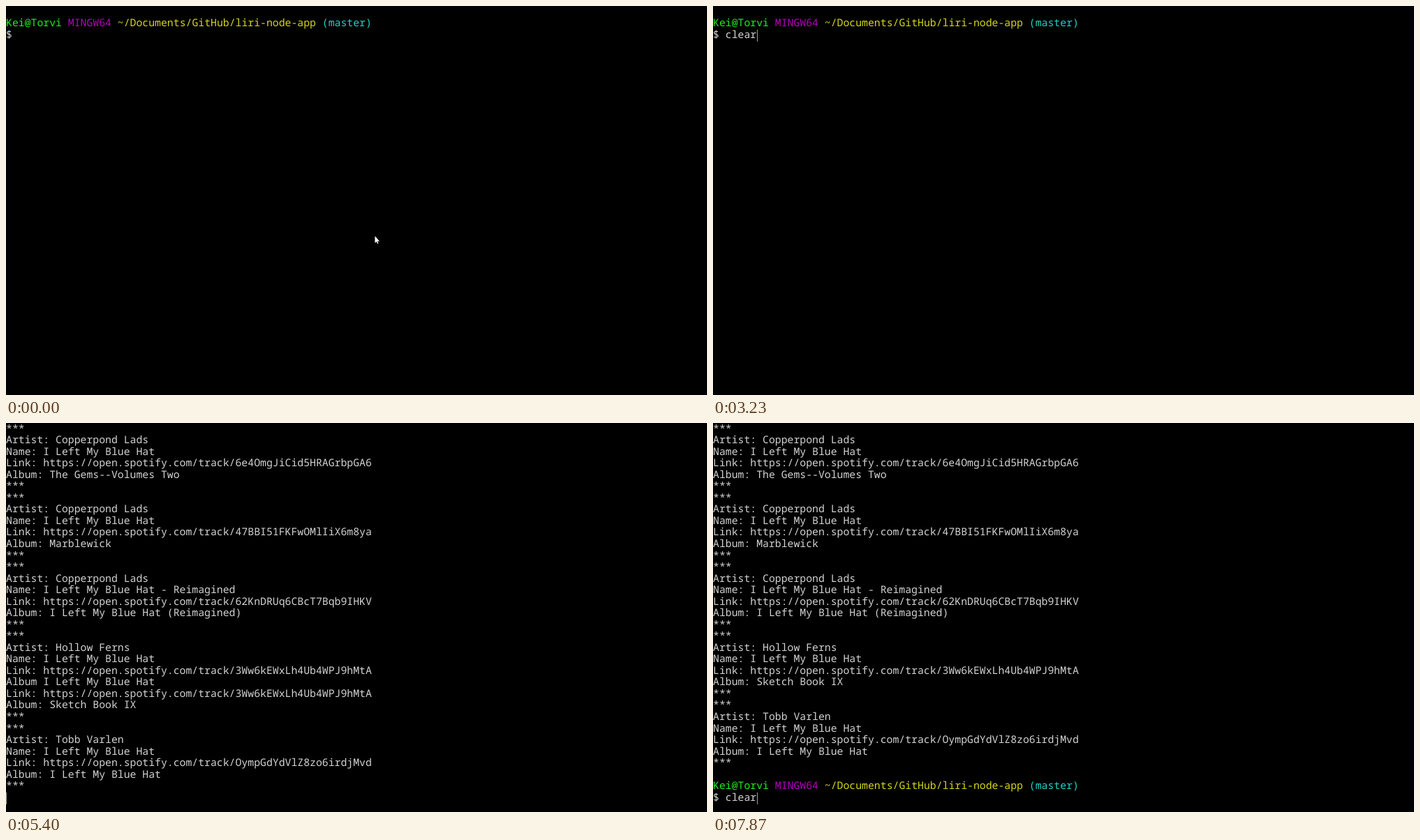
Animation of 1004x558 px, one loop 8 s. Source, as an HTML page:

```html
<!DOCTYPE html>
<html>
<head>
<meta charset="utf-8">
<style>
html, body { margin: 0; width: 100%; height: 100%; overflow: hidden; background: #000; }
pre {
  position: absolute; left: 0; top: -0.3px; margin: 0; color: #d2d2d2;
  font: 500 14.81px/16.53px "Noto Sans Mono", "DejaVu Sans Mono", monospace;
  text-rendering: geometricPrecision; font-variant-ligatures: none;
}
#caret { position: absolute; left: 0; top: 0; width: 1px; height: 17px; background: #a0a0a0; }
#mouse { position: absolute; left: 528px; top: 0; overflow: visible; }
</style>
</head>
<body>
<pre id="term"></pre>
<div id="caret"></div>
<svg id="mouse" width="8" height="12"><path d="M.4 0V10L2.6 7.9 4.1 11 5.4 10.4 4 7.4H7Z" fill="#fff"/></svg>
<script>
const LOOP = 8000, COL = 8.886, ROW = 16.53, SWEEP_COLS = 60;
const $ = id => document.getElementById(id);
const term = $('term'), caret = $('caret'), mouse = $('mouse');

const PROMPT = 'Kei@Torvi MINGW64 ~/Documents/GitHub/liri-node-app (master)';
const COLORS = ['#1cf01c', '#b400bc', '#d6d61a', '#1ed4c8'];
const promptHtml = PROMPT.split(' ')
  .map((s, i) => `<span style="color:${COLORS[i]}">${s}</span>`).join(' ');

const RUN = '$ node liri.js do-what-it-says';
const BAND = 'Copperpond Lads', SONG = 'I Left My Blue Hat';
const block = (artist, name, id, album) => [
  '***', 'Artist: ' + artist, 'Name: ' + name,
  'Link: https://open.spotify.com/track/' + id, 'Album: ' + album, '***'
];
const buffer = [
  '', PROMPT, RUN, 'this is loaded', 'Content Added!',
  ...block(BAND, SONG, '6e4OmgJiCid5HRAGrbpGA6', 'The Gems--Volumes Two'),
  ...block(BAND, SONG, '47BBI51FKFwOMlIiX6m8ya', 'Marblewick'),
  ...block(BAND, SONG + ' - Reimagined', '62KnDRUq6CBcT7Bqb9IHKV', SONG + ' (Reimagined)'),
  ...block('Hollow Ferns', SONG, '3Ww6kEWxLh4Ub4WPJ9hMtA', 'Sketch Book IX'),
  ...block('Tobb Varlen', SONG, 'OympGdYdVlZ8zo6irdjMvd', SONG),
  '', PROMPT
];

// time, first and end buffer line, input line, characters repainted so far
const steps = [
  [0, 0, 2, '$ '],
  [3200, 0, 2, '$ clear'],
  [3730, 0, 2, RUN],
  [4470, 0, 3, ''],
  [4700, 0, 4, ''],
  [4970, 0, 5, ''],
  [5240, 3, 35, '', 717],
  [5270, 3, 35, '', 1350],
  [5300, 3, 35, ''],
  [5370, 5, 35, '', 660],
  [5400, 5, 35, '', 1325],
  [5440, 5, 35, ''],
  [5500, 5, 37, '$ '],
  [7600, 5, 37, RUN],
  [7840, 5, 37, '$ clear']
];
const blinks = [200, 730, 1260, 1830, 2370, 2850, 3200, 4300, 4470, 5240,
  5370, 5900, 6440, 6970, 7500];

const view = (top, end, input) => [...buffer.slice(top, end), input];

// Repaints from top left, leaving the old rows after the given position.
function sweep(fresh, old, pos) {
  const r = Math.floor(pos / SWEEP_COLS), c = pos % SWEEP_COLS;
  return Array.from({ length: 33 }, (_, i) => {
    const a = fresh[i] || '', b = old[i] || '';
    return i < r ? a : i > r ? b : a.slice(0, c) + b.slice(c);
  });
}

let shown;
function draw(now) {
  const t = now % LOOP;
  const step = steps.filter(s => s[0] <= t).pop();
  if (step !== shown) {
    shown = step;
    const [, top, end, input, pos] = step;
    let rows = view(top, end, input);
    if (pos) rows = sweep(rows, top === 5 ? view(3, 35, '') : [], pos);
    term.innerHTML = rows.map(s => s === PROMPT ? promptHtml : s).join('\n');
    const y = rows.length - 1, x = rows[y].length;
    caret.style.transform =
      `translate(${Math.round(x * COL + .4)}px, ${Math.round(y * ROW + .55)}px)`;
  }
  const on = blinks.filter(b => b <= t).length % 2;
  caret.style.visibility = on ? 'visible' : 'hidden';
  mouse.style.visibility = t < 1400 ? 'visible' : 'hidden';
  mouse.style.transform = `translateY(${330 - Math.min(1, t / 900)}px)`;
}

const start = performance.now();
function tick() {
  draw(performance.now() - start);
  requestAnimationFrame(tick);
}
tick();
</script>
</body>
</html>
```
